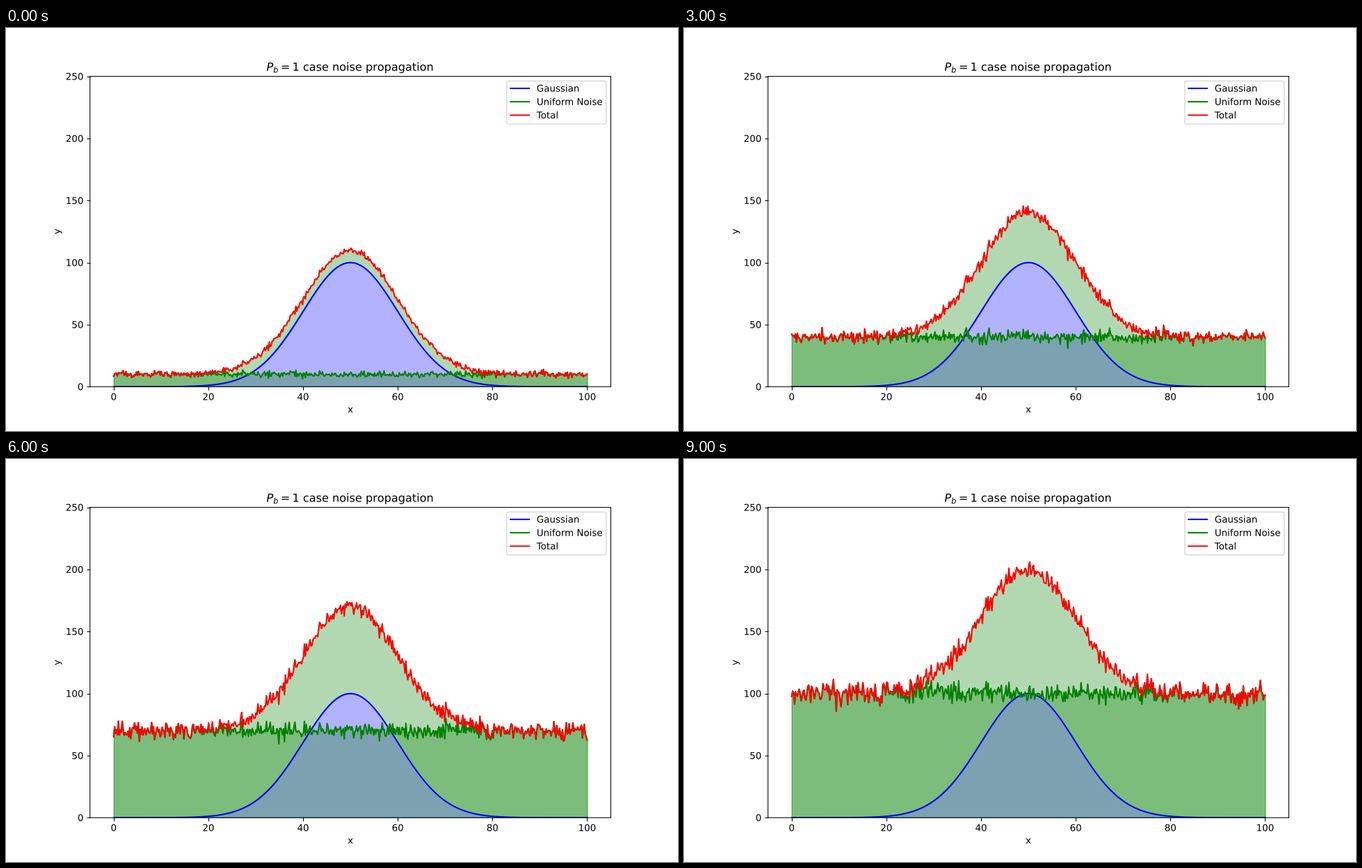
Animation, 966 px wide and 580 px high, one loop 9.5 s. Source, as a matplotlib script:

```python
import numpy as np
import matplotlib.pyplot as plt
from matplotlib.animation import FuncAnimation
from matplotlib.patheffects import Normal

# smooth, unsnapped edges and text drawn as outlines at sub-pixel positions
plt.rcParams.update({
    "path.snap": False,
    "path.effects": [Normal()],
    "text.hinting": "none",
})

DPI = 96.6
FRAMES = 19
SPREAD = 0.42

x = np.linspace(0, 100, 500)
gauss = 100 * np.exp(-((x - 50) ** 2) / (2 * 10 ** 2))

# the small surplus keeps the pixel size from being floored one short
fig, ax = plt.subplots(figsize=(966.001 / DPI, 580.001 / DPI), dpi=DPI)
ax.set_xlim(-5, 105)
ax.set_ylim(0, 250)
ax.set_xlabel("x")
ax.set_ylabel("y")
ax.set_title(r"$P_b = 1$ case noise propagation")

ax.plot(x, gauss, color="blue", label="Gaussian")
noise_line, = ax.plot([], [], color="green", label="Uniform Noise")
total_line, = ax.plot([], [], color="red", label="Total")
ax.legend(loc="upper right")
ax.fill_between(x, 0, gauss, color="blue", alpha=0.3)

fills = []


def shade(low, high):
    fills.append(ax.fill_between(x, low, high, color="green", alpha=0.3))


def update(i):
    level = 10 + 5 * i
    rng = np.random.default_rng(100 + i)
    noise = rng.normal(level, SPREAD * np.sqrt(level), x.size)
    total = gauss + noise

    while fills:
        fills.pop().remove()
    shade(0, noise)
    shade(gauss, total)
    noise_line.set_data(x, noise)
    total_line.set_data(x, total)
    return [noise_line, total_line, *fills]


anim = FuncAnimation(fig, update, frames=FRAMES, init_func=lambda: update(0),
                     interval=500, repeat=True, repeat_delay=0, blit=False)
plt.show()
```
